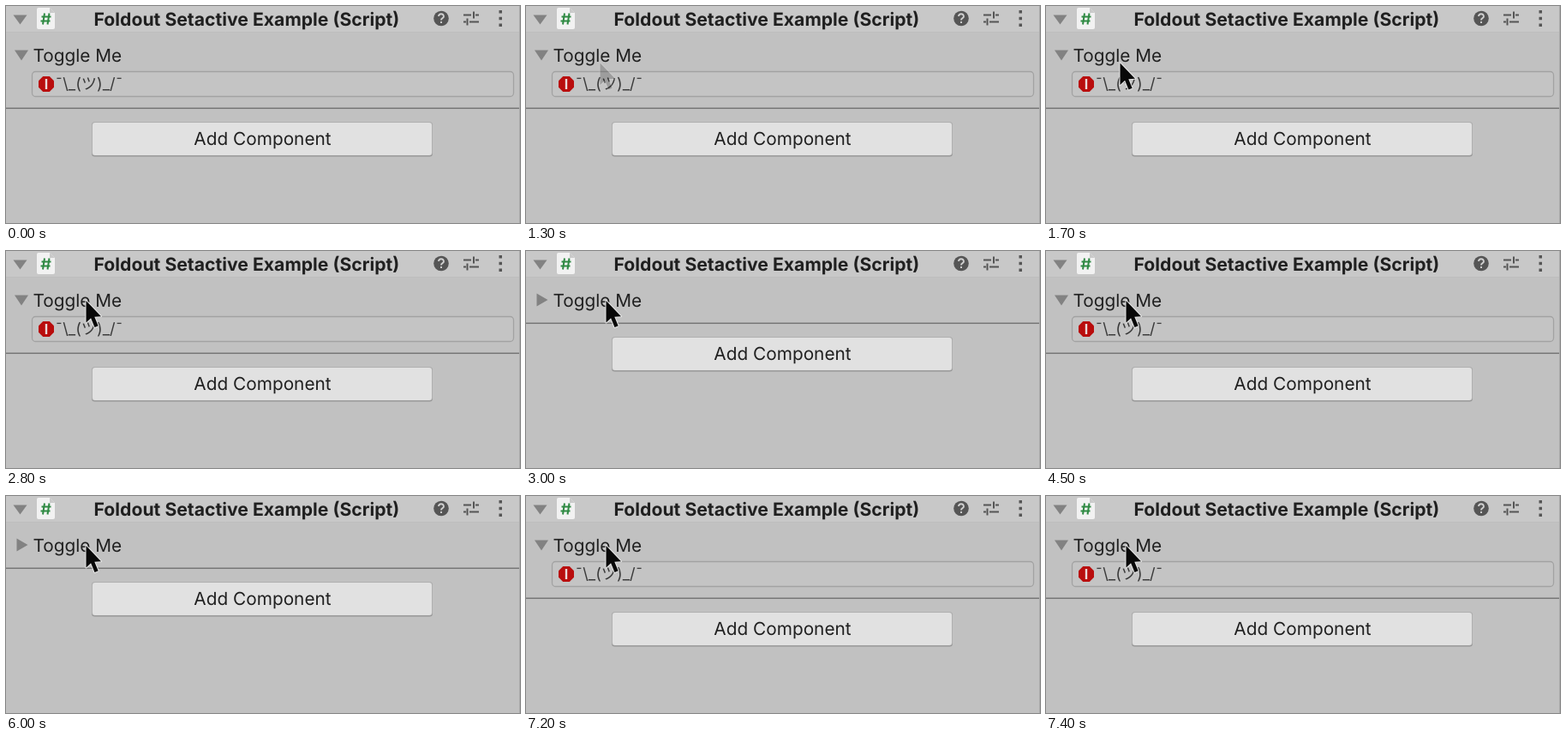
Animation of 600x253 px, one loop 8000 ms. Source, as an HTML page:

```html
<!DOCTYPE html>
<html lang="en">
<head>
<meta charset="utf-8">
<title>Foldout</title>
<style>
  html, body { margin: 0; width: 100%; height: 100%; overflow: hidden; background: #c1c1c1; }
  svg { display: block; width: 100%; height: 100%; }
  text { font: 20.8px Inter, sans-serif; fill: #202020; text-rendering: geometricPrecision; }
  .title { font-size: 21.2px; font-weight: 700; }
  .message { font: 18.3px Inter, "Noto Sans CJK JP", "Noto Sans CJK", sans-serif; fill: #3a3a3a; }
  .icon { fill: #555; }
  .arrow { fill: #828282; }
</style>
</head>
<body>
<svg viewBox="0 0 600 253">
  <rect width="600" height="253" fill="#c1c1c1"/>
  <rect width="600" height="30" fill="#c8c8c8"/>
  <path d="M0 30.5H600" stroke="#bebebe"/>
  <path d="M599.5 0V253" stroke="#aaa"/>

  <!-- Component header -->
  <path class="arrow" d="M8.5 10.5H24.5L16.5 21.5Z"/>
  <path d="M38 2H51L57 8V25Q57 27 55 27H38Q36 27 36 25V4Q36 2 38 2Z" fill="#f2f2f2"/>
  <path d="M51 2V8H57Z" fill="#c9c9c9"/>
  <path d="M45 8.5L43 21.5M50.5 8.5L48.5 21.5M41.5 12.5H52.5M40.5 17.5H51.5" fill="none" stroke="#2f8a43" stroke-width="2"/>
  <text class="title" x="102.5" y="22.5">Foldout Setactive Example (Script)</text>
  <g class="icon">
    <circle cx="508" cy="14.5" r="8.8"/>
    <path d="M505 12Q505.3 9.3 508 9.3T511 12Q511 13.4 509.3 14.3Q508 15 508 16.5M508 18V20" fill="none" stroke="#d0d0d0" stroke-width="1.9"/>
    <path d="M534 10.5H543M548 10.5H552M534 18.5H537M541 18.5H552M546 6.5V14.5M538.5 14.5V22.5" fill="none" stroke="#555" stroke-width="2"/>
    <path d="M575.5 5h3.5v3.5h-3.5zM575.5 12.7h3.5v3.5h-3.5zM575.5 20.4h3.5v3.5h-3.5z"/>
  </g>

  <!-- Foldout -->
  <path class="arrow" id="arrow"/>
  <text x="31.5" y="64.5">Toggle Me</text>
  <g id="content">
    <rect x="30.5" y="76.5" width="562" height="29" rx="4" fill="#c4c4c4" stroke="#a2a2a2" stroke-width="1.3"/>
    <path d="M43.2 82H50.8L56 87.2V94.8L50.8 100H43.2L38 94.8V87.2Z" fill="#b90d0d"/>
    <path d="M47 85V97" stroke="#eadada" stroke-width="2.4"/>
    <text class="message" x="57.5" y="97">¯\_(ツ)_/¯</text>
  </g>

  <g id="footer">
    <path d="M0 119.3H599" stroke="#777" stroke-width="1.4"/>
    <rect x="100" y="135.5" width="398" height="40" rx="3.5" fill="#8f8f8f"/>
    <rect x="100" y="135" width="398" height="39.5" rx="3.5" fill="#b0b0b0"/>
    <rect x="101" y="136" width="396" height="38" rx="3" fill="#e1e1e1"/>
    <text x="299.5" y="162" text-anchor="middle">Add Component</text>
  </g>

  <path id="cursor" d="M0 0V25.5L5.6 20.3L10 31L14.2 29.2L9.8 18.8L17.5 18.3Z" fill="#080808" stroke="#e8e8e8" stroke-width="2" stroke-linejoin="round" paint-order="stroke"/>
</svg>
<script>
  const LOOP = 8000, STEP = 100;
  const toggles = [3000, 4400, 6000, 7200];
  const [arrow, content, footer, cursor] =
    ["arrow", "content", "footer", "cursor"].map(id => document.getElementById(id));

  // Progress of a five-step transition that shows its first change at start.
  const progress = (time, start) => Math.max(0, Math.min(1, (time - start + STEP) / 500));
  const mix = (a, b, p) => a + (b - a) * p;

  function draw(now) {
    const time = Math.floor(now % LOOP / STEP) * STEP;
    const open = toggles.filter(t => t <= time).length % 2 === 0;
    arrow.setAttribute("d", open ? "M10 51.5H26L18 63.5Z" : "M12.5 49.5L25.5 57L12.5 64.5Z");
    content.style.display = open ? "" : "none";
    footer.setAttribute("transform", `translate(0 ${open ? 0 : -35})`);

    const move = progress(time, 2400);
    cursor.setAttribute("transform", `translate(${mix(86.5, 93.5, move)} ${mix(66.5, 58, move)})`);
    cursor.setAttribute("opacity", progress(time, 1300));
    requestAnimationFrame(draw);
  }
  requestAnimationFrame(draw);
</script>
</body>
</html>
```
